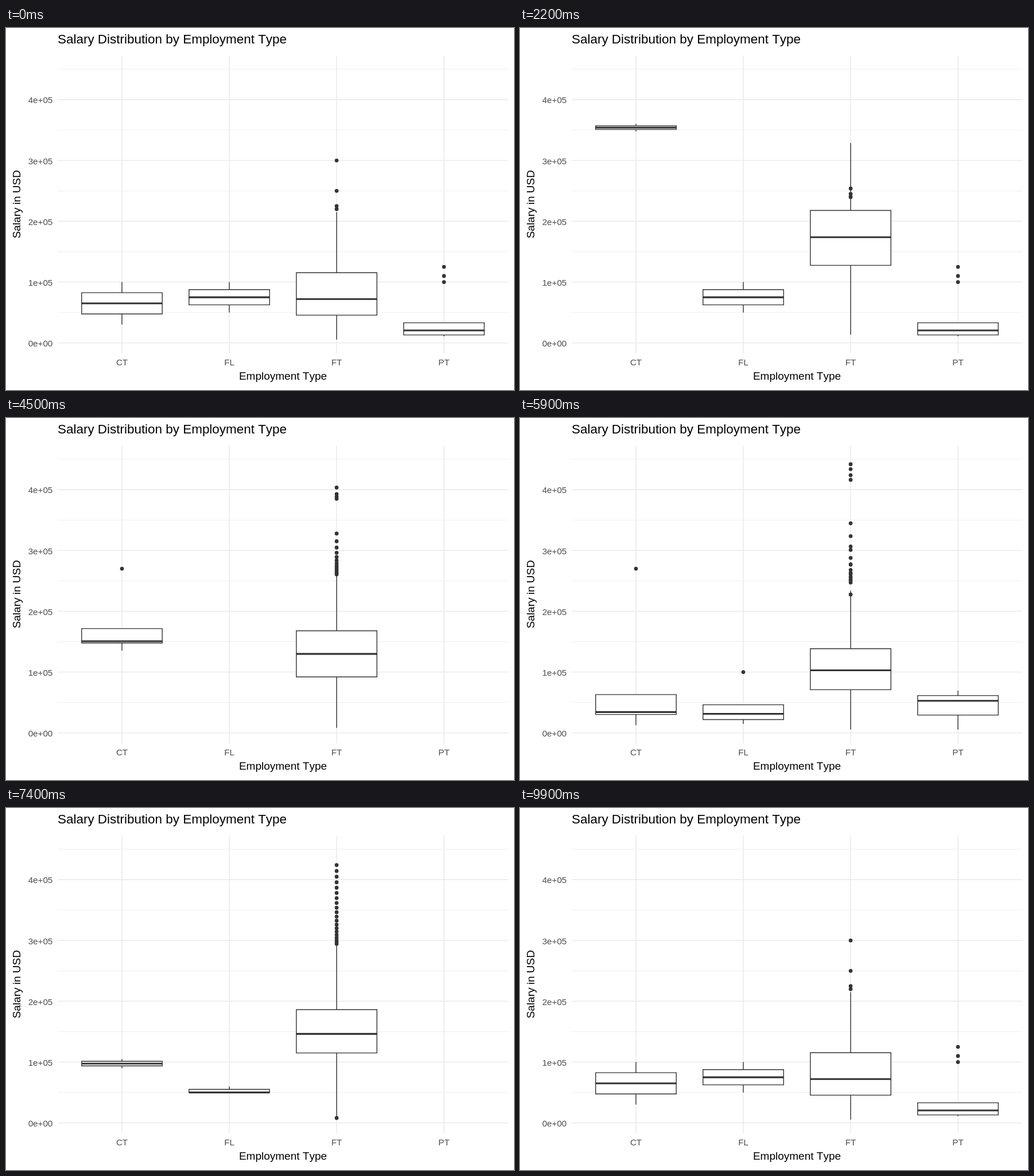
An HTML page for the animation above (10 s loop, 885 px wide and 632 px high).

```html
<!DOCTYPE html>
<html lang="en">
<head>
<meta charset="utf-8">
<title>Salary Distribution by Employment Type</title>
<style>
html, body { margin: 0; width: 100%; height: 100%; overflow: hidden; background: #fff; }
svg { display: block; width: 885px; height: 632px; }
text { font-family: Arial, "Liberation Sans", sans-serif; font-kerning: none; }
.title { font-size: 22.45px; }
.name { font-size: 19px; text-anchor: middle; }
.tick { font-size: 15.2px; fill: #4d4d4d; text-anchor: middle; }
.tick.left { text-anchor: end; }
.grid { fill: none; stroke: #ebebeb; stroke-width: 1.6; }
.grid.minor { stroke-width: .8; }
.edge { fill: none; stroke: #333; stroke-width: 1.4; }
.box { fill: #fff; }
.mid { stroke-width: 3.1; }
.dots { stroke-width: 6.7; stroke-linecap: round; }
</style>
</head>
<body>
<svg id="plot" viewBox="0 0 885 632"></svg>
<script>
const LOOP = 10000, TICK = 100, HALF = 70.2;
const svg = document.getElementById('plot');

const add = (tag, cls, attrs = {}, text = '') => {
  const el = document.createElementNS('http://www.w3.org/2000/svg', tag);
  el.setAttribute('class', cls);
  for (const k in attrs) el.setAttribute(k, attrs[k]);
  el.textContent = text;
  return svg.appendChild(el);
};
const lerp = (a, b, p) => a + (b - a) * p;
const mean = list => list.reduce((a, b) => a + b, 0) / list.length;
const px = i => 202 + 187 * i;
const py = k => 549.7 - 1.0615 * k;   // k: thousands of USD

// Box plot of a sorted sample: whiskers reach at most 1.5 box heights
function boxplot(...v) {
  const q = f => {
    const at = f * (v.length - 1), i = Math.floor(at);
    return lerp(v[i], v[i + 1] ?? v[i], at - i);
  };
  const [q1, q2, q3] = [.25, .5, .75].map(q), reach = 1.5 * (q3 - q1);
  const inside = x => x >= q1 - reach && x <= q3 + reach;
  const kept = v.filter(inside);
  return { box: [kept[0], q1, q2, q3, kept.at(-1)], out: v.filter(x => !inside(x)) };
}
const summary = (box, out = []) => ({ box, out });

// Full-time outliers: a tight top cluster, then a decaying tail;
// the later state is a falling curve, shuffled by a stride, plus one low value
const rank = Array.from({ length: 21 }, (_, i) => i);
const tail = rank.map(i => i < 4 ? 450 - 27 * Math.sqrt(i / 3) : 238 + 102 * Math.exp((4 - i) / 5));
const curve = rank.map(i => i < 20 ? 293 + 131 * (1 - (13 + 7 * i) % 20 / 20) ** 1.5 : 8);

// Four states for each group; null where the group is absent
const groups = [
  { name: 'CT', states: [boxplot(30, 100), boxplot(416), boxplot(7.5, 26, 30, 60.4, 270), boxplot(90, 105)] },
  { name: 'FL', states: [boxplot(50, 100), null, boxplot(12.5, 20, 30, 45.6, 100), boxplot(50, 50, 60)] },
  { name: 'FT', states: [
    summary([5.4, 45.5, 72, 115.4, 215], [250, 225, 220, 300, 225]),
    summary([15, 145, 195.5, 239.7, 353]),
    summary([5.1, 68, 100, 135.3, 230], tail),
    summary([10, 115, 146.3, 186.3, 291.5], curve)] },
  { name: 'PT', states: [
    boxplot(10.8, 12, 12, 13, 15, 18, 20.4, 25, 30, 33, 100, 110, 125), null,
    boxplot(5.4, 29.3, 52.7, 61.3, 69.5), null] }
];

function drawFrame() {
  const rows = (from, to) => {
    let d = '';
    for (let k = from; k <= to; k += 100) d += `M90 ${py(k)}H875`;
    return d;
  };
  add('path', 'grid minor', { d: rows(50, 450) });
  add('path', 'grid', { d: rows(0, 400) + groups.map((g, i) => `M${px(i)} 48V568`).join('') });
  add('text', 'title', { x: 90, y: 27 }, 'Salary Distribution by Employment Type');
  add('text', 'name', { x: 482.5, y: 614 }, 'Employment Type');
  add('text', 'name', { transform: 'translate(24.5 307.7) rotate(-90)' }, 'Salary in USD');
  for (let k = 0; k < 5; k++)
    add('text', 'tick left', { x: 81.3, y: py(k * 100) + 6.3 }, `${k}e+0${k ? 5 : 0}`);
  groups.forEach((g, i) => {
    add('text', 'tick', { x: px(i), y: 589 }, g.name);
    g.el = ['dots', 'whisker', 'box', 'mid'].map(c => add('path', 'edge ' + c));
  });
}

// Ticks at which the change out of each state begins and ends
const legs = [[8, 25], [34, 50], [58, 74], [83, 99]];

function phase(tick) {
  const k = legs.findIndex(([, end]) => tick < end);
  if (k < 0) return [0, 0];
  const [a, b] = legs[k];
  return [k, Math.max(0, (tick - a) / (b - a))];
}

// Outliers without a counterpart gather at the mean; shorter lists repeat
function blend(from, to, p) {
  const at = (list, other, i) => list.length ? list[i % list.length] : mean(other);
  return Array.from({ length: Math.max(from.length, to.length) },
    (_, i) => lerp(at(from, to, i), at(to, from, i), p));
}

// A group that is absent in either state switches only at the end
function pose({ states }, k, p) {
  const a = states[k], b = states[(k + 1) % 4];
  if (!a || !b || !p) return a;
  return { box: a.box.map((v, i) => lerp(v, b.box[i], p)), out: blend(a.out, b.out, p) };
}

function shapes(x, s) {
  if (!s) return ['', '', '', ''];
  const [lo, q1, m, q3, hi] = s.box.map(py);
  const l = x - HALF, r = x + HALF;
  return [
    s.out.map(v => `M${x} ${py(v)}h.01`).join(''),
    `M${x} ${lo}V${q1}M${x} ${q3}V${hi}`,
    `M${l} ${q1}V${q3}H${r}V${q1}Z`,
    `M${l} ${m}H${r}`
  ];
}

let last = -1;
function show(now) {
  const tick = Math.floor((now % LOOP) / TICK);
  if (tick === last) return;
  last = tick;
  const [k, p] = phase(tick);
  groups.forEach((g, i) =>
    shapes(px(i), pose(g, k, p)).forEach((d, j) => g.el[j].setAttribute('d', d)));
}

drawFrame();
const start = performance.now();
const loop = () => { show(performance.now() - start); requestAnimationFrame(loop); };
loop();
</script>
</body>
</html>
```
